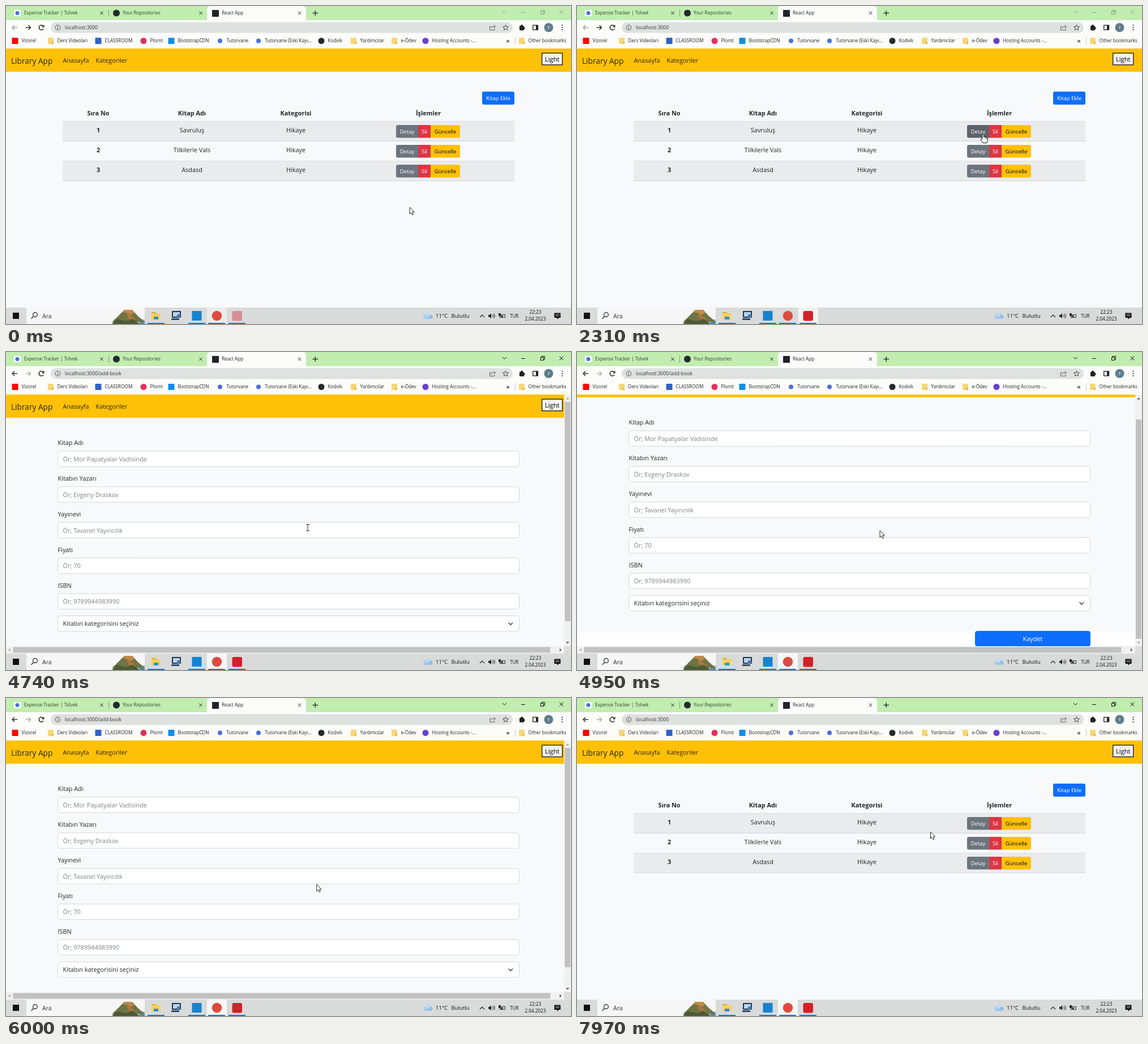
An HTML page with a canvas that plays this animation: 998x561 px, repeating every 8000 ms.

```html
<!DOCTYPE html>
<html lang="tr">
<head>
<meta charset="utf-8">
<title>Library App</title>
<style>
html, body { margin: 0; width: 998px; height: 561px; overflow: hidden; background: #f8f9fa; }
canvas { display: block; }
</style>
</head>
<body>
<canvas id="stage" width="998" height="561"></canvas>
<script>
const ctx = document.getElementById('stage').getContext('2d');
const LOOP = 8000, W = 998, TOP = 75, VIEW_H = 444, MAX_SCROLL = 36;
const ADD_AT = 4080, HOME_AT = 6920, FOCUS_AT = 3900;
const UI = 8.2, BODY = 10.9, SMALL = 9.5;
const INK = '#212529', AMBER = '#ffc107';

// time, x, y of the pointer tip
const PATH = [
  [0, 713, 355], [1300, 713, 355], [1700, 704, 290], [2100, 716, 227], [2310, 717, 226],
  [2700, 722, 228], [2940, 736, 228], [3150, 775, 226], [3450, 840, 190], [3700, 896, 152],
  [3900, 881, 161], [4130, 881, 161], [4450, 640, 265], [4700, 533, 310], [4800, 533, 310],
  [4950, 535, 315], [5400, 540, 320], [6000, 549, 329], [6250, 480, 265], [6720, 124, 95],
  [7000, 124, 95], [7400, 330, 150], [7800, 610, 230], [8000, 627, 237]
];
const BOOKS = ['Savruluş', 'Tilkilerle Vals', 'Asdasd'];
const FIELDS = [
  ['Kitap Adı', 'Mor Papatyalar Vadisinde'], ['Kitabın Yazarı', 'Evgeny Draskov'],
  ['Yayınevi', 'Tavanel Yayıncılık'], ['Fiyatı', '70'], ['ISBN', '9789944983990']
];
const ACTIONS = [
  ['Detay', 689, 39, '#6c757d', '#5c636a', '#fff'],
  ['Sil', 728, 22, '#dc3545', '#bb2d3b', '#fff'],
  ['Güncelle', 750, 52, AMBER, '#ffca2c', '#000']
];
// icon kind, icon centre, colour, label
const BOOKMARKS = [
  ['sq', 16, '#f00', 'Vizorel'], ['dir', 79, '', 'Ders Videoları'], ['sq', 163, '#2f62c9', 'CLASSROOM'],
  ['dot', 243, '#e0315f', 'Plomt'], ['sq', 292, '#0d8fe8', 'BootstrapCDN'], ['dot', 378, '#4a6fd8', 'Tutorvane'],
  ['dot', 446, '#4a6fd8', 'Tutorvane (Eski Kayı...'], ['dot', 557, '#24292f', 'Kodvik'], ['dir', 614, '', 'Yardımcılar'],
  ['dir', 686, '', 'e-Ödev'], ['dot', 741, '#6b3fd0', 'Hosting Accounts -...']
];

const clamp = v => Math.max(0, Math.min(1, v));
const ease = (t, a, b) => { const k = clamp((t - a) / (b - a)); return k * k * (3 - 2 * k); };

function rect(x, y, w, h, fill) {
  ctx.fillStyle = fill;
  ctx.fillRect(x, y, w, h);
}
function box(x, y, w, h, r, fill, stroke) {
  ctx.beginPath();
  ctx.roundRect(x, y, w, h, r);
  if (fill) { ctx.fillStyle = fill; ctx.fill(); }
  if (stroke) { ctx.strokeStyle = stroke; ctx.lineWidth = 0.9; ctx.stroke(); }
}
function dot(x, y, r, fill) {
  ctx.beginPath();
  ctx.arc(x, y, r, 0, 7);
  ctx.fillStyle = fill;
  ctx.fill();
}
function ring(x, y, r, color, a = 0, b = 7) {
  ctx.beginPath();
  ctx.arc(x, y, r, a, b);
  ctx.strokeStyle = color;
  ctx.stroke();
}
function line(color, width, ...p) {
  ctx.beginPath();
  for (let i = 0; i < p.length; i += 2) ctx.lineTo(p[i], p[i + 1]);
  ctx.strokeStyle = color;
  ctx.lineWidth = width;
  ctx.stroke();
}
function poly(fill, ...p) {
  ctx.beginPath();
  for (let i = 0; i < p.length; i += 2) ctx.lineTo(p[i], p[i + 1]);
  ctx.closePath();
  ctx.fillStyle = fill;
  ctx.fill();
}
function text(s, x, y, size = BODY, color = INK, align = 'left', weight = 400) {
  ctx.font = `${weight} ${size}px "Open Sans", "Noto Sans", sans-serif`;
  ctx.textAlign = align;
  ctx.fillStyle = color;
  ctx.fillText(s, x, y + size * 0.36);
}
function cross(x, y, r, color, w = 1) {
  line(color, w, x - r, y - r, x + r, y + r);
  line(color, w, x + r, y - r, x - r, y + r);
}
function folder(x, y) {
  box(x - 5, y - 5, 10, 11, 1, '#f7d774');
  rect(x + 2, y + 2, 3, 4, '#e5b94a');
}

function pointerAt(t) {
  let i = 1;
  while (i < PATH.length - 1 && PATH[i][0] < t) i++;
  const a = PATH[i - 1], b = PATH[i], k = clamp((t - a[0]) / (b[0] - a[0]));
  return [a[1] + (b[1] - a[1]) * k, a[2] + (b[2] - a[2]) * k];
}

function tabs(active) {
  rect(0, 0, W, 25, '#c1edb0');
  box(14, 7, 12, 11, 1, '#fff');
  dot(20, 12.5, 3.5, '#4a6fd8');
  text('Expense Tracker | Tolvek', 32, 12.5, UI, '#34452f');
  cross(169, 12.5, 2.7, '#222');
  line('#7f9d74', 1, 181.5, 6, 181.5, 19);
  dot(195, 12.5, 6, '#24292f');
  text('Your Repositories', 206, 12.5, UI, '#34452f');
  cross(344, 12.5, 2.7, '#222');
  box(355, 0, 175, 27, [6, 6, 0, 0], '#fcfdfb');
  box(364, 7, 12, 12, 1, '#20232a');
  text('React App', 381, 12.5, UI);
  cross(518.5, 12.5, 2.7, '#222');
  line('#222', 1.3, 541.5, 12.5, 551, 12.5);
  line('#222', 1.3, 546.2, 8, 546.2, 17);
  const c = active ? '#111' : '#8aa381';
  line(c, 1, 877, 9, 880.5, 12.5, 884, 9);
  line(c, 1, 910, 11.5, 917, 11.5);
  ctx.lineWidth = 1;
  ctx.strokeStyle = c;
  ctx.strokeRect(944.5, 9.5, 5, 5);
  line(c, 1, 946, 9, 946, 7.5, 951.5, 7.5, 951.5, 13, 950, 13);
  cross(981, 11, 3.5, c);
}

function arrow(x, dir, color) {
  line(color, 1.4, x - 4.5, 38, x + 4.5, 38);
  line(color, 1.4, x + dir * 0.5, 34, x + dir * 4.5, 38, x + dir * 0.5, 42);
}

function toolbar(url, canBack) {
  rect(0, 25, W, 50, '#fcfdfb');
  arrow(15.5, -1, canBack ? '#222' : '#999');
  arrow(39, 1, canBack ? '#aaa' : '#222');
  ctx.lineWidth = 1.5;
  ring(62.5, 38, 4.2, '#222', 0.5, 5.5);
  poly('#222', 67.5, 33, 67.5, 37.5, 63, 37.5);
  box(79, 28.5, 816, 19, 9.5, '#dfe1e0');
  ctx.lineWidth = 1;
  ring(91.5, 38, 4.4, '#555');
  line('#555', 1.1, 91.5, 37, 91.5, 41);
  rect(91, 35, 1.1, 1.2, '#555');
  text(url, 104, 38.3, UI + 0.45, '#333');
  line('#666', 1, 857, 36, 854.5, 36, 854.5, 42.5, 863, 42.5, 863, 40);
  line('#666', 1, 857, 40, 858.5, 36.5, 864, 36.5);
  line('#666', 1, 861.5, 33.5, 864.5, 36.5, 861.5, 39.5);
  const star = [];
  for (let i = 0; i <= 10; i++) {
    const r = i % 2 ? 2.3 : 5.2, a = i * Math.PI / 5 - Math.PI / 2;
    star.push(882.5 + r * Math.cos(a), 38.3 + r * Math.sin(a));
  }
  line('#444', 1, ...star);
  box(907, 35, 8, 8, 1, '#222');
  dot(911, 34.5, 1.8, '#222');
  dot(915, 39, 1.8, '#222');
  ctx.strokeStyle = '#222';
  ctx.lineWidth = 1.3;
  ctx.strokeRect(930.7, 34, 8.8, 8);
  rect(936, 34, 3.5, 8, '#222');
  dot(958.5, 38, 8, '#5f7d8b');
  text('T', 958.5, 38, 8, '#fff', 'center');
  for (const y of [34, 38, 42]) dot(982.5, y, 1.1, '#222');

  for (const [kind, x, color, label] of BOOKMARKS) {
    if (kind === 'dir') folder(x, 61);
    else if (kind === 'sq') box(x - 5.5, 56, 11, 11, 1, color);
    else dot(x, 61.5, color === '#4a6fd8' ? 4 : 5.5, color);
    text(label, x + 11.5, 61.3, UI, '#222');
  }
  text('»', 886.5, 61, 11, '#222', 'center', 600);
  line('#c5cbc3', 1, 899.5, 55, 899.5, 68);
  folder(911, 61);
  text('Other bookmarks', 922.5, 61.3, UI, '#222');
}

function navbar(width) {
  rect(0, TOP, width, 41, AMBER);
  text('Library App', 9, 96.8, 13.7, '#2b2410');
  text('Anasayfa', 100.5, 96.3, BODY, '#2b2410');
  text('Kategoriler', 158.5, 96.3, BODY, '#2b2410');
  ctx.fillStyle = '#f3f3f3';
  ctx.fillRect(946.5, 83, 36.5, 21);
  ctx.strokeStyle = '#222';
  ctx.lineWidth = 1.4;
  ctx.strokeRect(946.7, 83.2, 36, 20.6);
  text('Light', 964.7, 94, 11.2, '#000', 'center');
}

function home(over) {
  rect(0, TOP, W, 457, '#f8f9fa');
  navbar(W);
  box(841, 151, 57, 23, 3, over(841, 151, 57, 23) ? '#0b5ed7' : '#0d6efd');
  text('Kitap Ekle', 869.5, 163, SMALL, '#fff', 'center');
  ['Sıra No', 'Kitap Adı', 'Kategorisi', 'İşlemler'].forEach((s, i) =>
    text(s, [163, 328.5, 512, 746][i], 189, BODY, INK, 'center', 700));
  rect(100, 203, 798, 1, '#cfd4da');
  BOOKS.forEach((name, i) => {
    const y = 203.5 + i * 35;
    if (i % 2 === 0) rect(100, y, 798, 35, '#e9ebec');
    rect(100, y + 34.5, 798, 1, '#d3d8de');
    text(i + 1, 163, y + 16, BODY, INK, 'center', 700);
    text(name, 328.5, y + 16, BODY, INK, 'center');
    text('Hikaye', 512, y + 16, BODY, INK, 'center');
    ACTIONS.forEach(([label, x, w, color, hot, ink], k) => {
      const r = [[3, 0, 0, 3], 0, [0, 3, 3, 0]][k];
      box(x, y + 6.5, w, 22.5, r, over(x, y + 6.5, w, 22.5) ? hot : color);
      text(label, x + w / 2, y + 18.3, SMALL, ink, 'center');
    });
  });
}

function scrollbars(scroll) {
  const grey = '#a3a3a3', dark = '#505050', c = '#c1c1c1';
  rect(986, TOP, 12, 457, '#f1f1f1');
  rect(0, 519, 986, 13, '#f1f1f1');
  rect(986, 519, 12, 13, '#dcdcdc');
  rect(987, 88 + scroll * 31 / MAX_SCROLL, 10, 387, c);
  rect(12.5, 520.5, 949, 10, c);
  poly(scroll > 0 ? dark : grey, 989, 83.5, 992, 80.5, 995, 83.5);
  poly(scroll < MAX_SCROLL ? dark : grey, 989, 511.5, 992, 514.5, 995, 511.5);
  poly(grey, 7.5, 522.5, 4.5, 525.5, 7.5, 528.5);
  poly(dark, 978, 522.5, 981, 525.5, 978, 528.5);
}

function form(scroll) {
  rect(0, TOP, W, 457, '#fff');
  ctx.save();
  ctx.beginPath();
  ctx.rect(0, TOP, 986, VIEW_H);
  ctx.clip();
  ctx.translate(0, -scroll);
  rect(0, TOP, 986, 456, '#f8f9fa');
  navbar(986);
  FIELDS.forEach(([label, hint], i) => {
    const y = i * 62.8;
    text(label, 91.5, 160.5 + y);
    box(91.5, 175 + y, 815, 27.3, 4.4, '#fff', '#ced4da');
    text('Ör; ' + hint, 100.5, 189 + y, BODY, '#7b828a');
  });
  box(91.5, 465.5, 815, 27.3, 4.4, '#fff', '#ced4da');
  text('Kitabın kategorisini seçiniz', 100.5, 479.5);
  line('#343a40', 1.4, 887.5, 477.5, 891.3, 481.2, 895, 477.5);
  box(703, 528, 204, 27.7, 4.4, '#0d6efd');
  text('Kaydet', 805, 542.3, BODY, '#fff', 'center');
  ctx.restore();
  scrollbars(scroll);
}

function mountain() {
  rect(190, 553, 55, 8, '#9db8c9');
  poly('#6f7444', 187, 558, 199, 546, 209, 536, 223, 536, 233, 547, 245, 557);
  poly('#c08a48', 205, 540, 209, 536, 223, 536, 227, 541, 220, 545, 213, 541);
  poly('#a9783f', 213, 541, 220, 545, 231, 555, 216, 552);
  poly('#4d5a35', 187, 561, 196, 552, 211, 556, 224, 552, 236, 561);
  rect(236, 557, 9, 4, '#55879d');
}

function taskbar(t) {
  rect(0, 532, W, 29, '#d9dada');
  box(12, 541, 11, 11, 0, '#111');
  rect(36, 532, 209, 29, '#f5f6f5');
  ctx.lineWidth = 1.2;
  ring(51.5, 544.5, 3.9, '#222');
  line('#222', 1.3, 48.7, 547.5, 44.5, 551.7);
  text('Ara', 64, 547, 10.6, '#333');
  mountain();

  const shown = ease(t, 80, 210), focus = ease(t, FOCUS_AT, FOCUS_AT + 200);
  const chrome = t < FOCUS_AT ? 0.6 * (1 - shown) : 0.5 + focus / 2;
  const rec = t < FOCUS_AT ? shown : 1 - focus;
  rect(355, 532, 35, 29, `rgba(246,247,246,${chrome})`);
  rect(391, 532, 35, 29, `rgba(246,247,246,${rec * 0.85})`);

  box(257, 540, 8, 4, 1, '#e8a520');
  box(257, 542, 16, 11, 1, '#fbd25c');
  rect(261, 548, 8, 5, '#2f8fd6');
  box(293, 538, 16, 12, 1, '#1f3350');
  rect(295, 540, 12, 8, '#b9d5ec');
  rect(292, 551, 14, 3, '#324a68');
  dot(305, 547, 3.2, '#4779ad');
  box(328.5, 538, 17, 17, 1, '#1683cf');
  dot(372.5, 546.5, 8.7, '#dd4b3e');
  ctx.globalAlpha = 0.4 + 0.6 * shown;
  box(399.5, 538, 17.5, 17.5, 3, '#d3202a');
  ctx.globalAlpha = 1;
  for (const x of [250, 322, 357, 393]) rect(x, 559, 30, 2, '#0a78d0');

  dot(741, 548, 4, '#a9cdf0');
  dot(746, 545.5, 5, '#bcdaf5');
  dot(750, 548.5, 3.5, '#8fbbe6');
  rect(741, 548, 9, 4, '#9cc4ec');
  text('11°C', 759, 547, 9.6, '#111');
  text('Bulutlu', 786.5, 547, 9.6, '#111');
  line('#222', 1.2, 837, 549, 841, 545, 845, 549);
  poly('#222', 852, 545, 854, 545, 857, 542, 857, 551, 854, 548.5, 852, 548.5);
  ctx.lineWidth = 0.9;
  for (const r of [2.5, 4.5, 6.5]) ring(857, 546.7, r, '#333', -0.75, 0.75);
  ctx.strokeStyle = '#222';
  ctx.strokeRect(872.5, 544.5, 9, 5);
  rect(874, 546, 4, 2.5, '#222');
  box(870, 542, 4, 5, 1, '#222');
  text('TUR', 890, 546.8, 8.2, '#111');
  text('22:23', 935, 540, 8.2, '#111', 'center');
  text('2.04.2023', 935, 552.5, 8.2, '#111', 'center');
  box(968.5, 541.5, 11, 8.5, 0.5, '#111');
  poly('#111', 972, 549, 977, 549, 974.5, 552.5);
  line('#ddd', 0.8, 970.5, 544, 977.5, 544);
  line('#ddd', 0.8, 970.5, 546.5, 977.5, 546.5);
}

function drawArrow(x, y) {
  ctx.save();
  ctx.translate(x, y);
  poly('#fff', 0, 0, 0, 12, 2.7, 9.6, 4.6, 13.7, 6.6, 12.8, 4.8, 8.7, 8.3, 8.5);
  ctx.strokeStyle = '#111';
  ctx.lineWidth = 0.9;
  ctx.stroke();
  ctx.restore();
}
function drawHand(x, y) {
  ctx.save();
  ctx.translate(x, y);
  ctx.beginPath();
  ctx.moveTo(-1.3, 9);
  ctx.lineTo(-1.3, 1);
  ctx.quadraticCurveTo(0, -1.2, 1.3, 1);
  ctx.lineTo(1.3, 5);
  ctx.quadraticCurveTo(3, 4, 4, 5.6);
  ctx.quadraticCurveTo(5.6, 4.8, 6.4, 6.3);
  ctx.quadraticCurveTo(8.4, 6, 8.4, 8);
  ctx.lineTo(8.2, 11.5);
  ctx.lineTo(6.8, 15.5);
  ctx.lineTo(0, 15.5);
  ctx.lineTo(-4, 9.8);
  ctx.quadraticCurveTo(-3.6, 7.4, -1.3, 9);
  ctx.fillStyle = '#fff';
  ctx.fill();
  ctx.strokeStyle = '#111';
  ctx.lineWidth = 1;
  ctx.stroke();
  line('#111', 0.7, 4, 6, 4, 8.5);
  line('#111', 0.7, 6.4, 7, 6.4, 9);
  ctx.restore();
}
function drawBeam(x, y) {
  line('#222', 1, x, y - 5, x, y + 5);
  line('#222', 1, x - 2.8, y - 5.5, x + 2.8, y - 5.5);
  line('#222', 1, x - 2.8, y + 5.5, x + 2.8, y + 5.5);
}

function draw(t) {
  const adding = t >= ADD_AT && t < HOME_AT;
  const scroll = MAX_SCROLL * (ease(t, 4790, 4930) - ease(t, 5520, 5660));
  const [x, y] = pointerAt(t);
  let link = false, typing = false;
  const inside = (bx, by, w, h) => x >= bx && x < bx + w && y >= by && y < by + h;
  const over = (...b) => {
    const hit = inside(...b);
    link = link || hit;
    return hit;
  };

  ctx.clearRect(0, 0, W, 561);
  if (adding) {
    form(scroll);
    typing = FIELDS.some((f, i) => inside(91, 175 + i * 62.8 - scroll, 816, 27.5));
  } else home(over);
  if (scroll < 20) over(100, 84, 116, 25);
  tabs(t >= FOCUS_AT);
  toolbar('localhost:3000' + (adding ? '/add-book' : ''), t >= ADD_AT);
  taskbar(t);
  (link ? drawHand : typing ? drawBeam : drawArrow)(x, y);
}

const start = performance.now();
function tick() {
  draw((performance.now() - start) % LOOP);
  requestAnimationFrame(tick);
}
tick();
</script>
</body>
</html>
```
